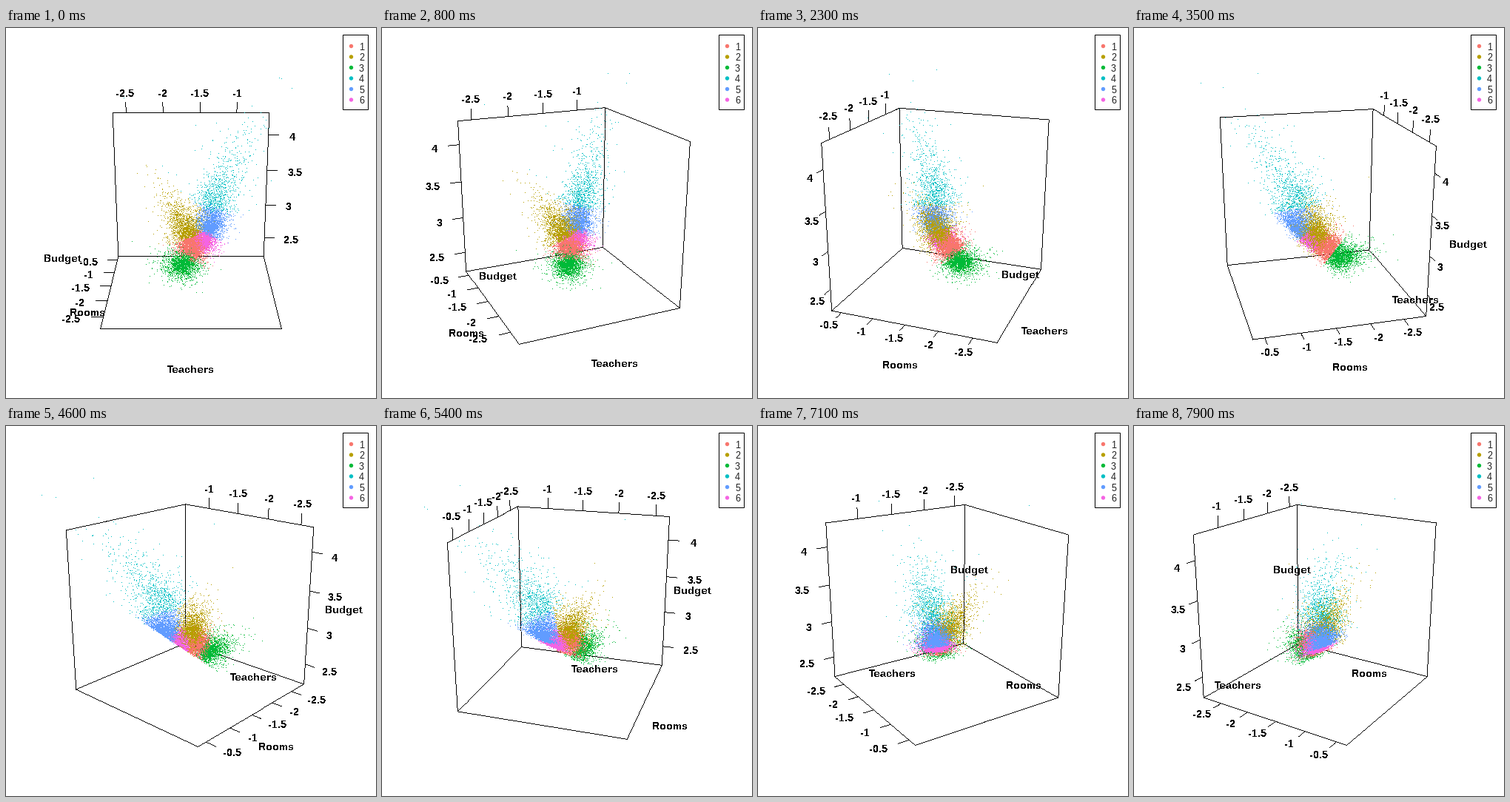
These frames come from a looping animation (500x500 px, 8000 ms). A matplotlib script:

```python
import numpy as np
import matplotlib.pyplot as plt
from matplotlib.animation import FuncAnimation
from matplotlib.colors import to_rgb
from matplotlib.patches import Circle, Rectangle

plt.rcParams.update({"text.hinting": "native", "text.hinting_factor": 1})

SIZE, FRAMES, STEP = 500, 80, 3            # pixels, frames, degrees per frame
FOCAL, DIST, TILT = 933, 8.22, np.radians(20)
TICK, LABEL, TITLE = 1.133, 1.27, 1.30     # distances from the box centre
PX = 0.72                                  # points per pixel at 100 dpi
EM = 14
COLORS = ["#F8766D", "#B79F00", "#00BA38", "#00BFC4", "#619CFF", "#F564E3"]

# ticks per axis: value and position inside the unit box
X_TICKS = [(v, 1.528 + 0.943 * v) for v in (-2.5, -2, -1.5, -1)]
Y_TICKS = [(v, 0.956 * v - 3.118) for v in (2.5, 3, 3.5, 4)]
Z_TICKS = [(v, -1.272 - 0.80 * v) for v in (-0.5, -1, -1.5, -2, -2.5)]
TITLES = {"Teachers": (0, -TITLE, TITLE),
          "Budget": (-TITLE, 0, TITLE),
          "Rooms": (-TITLE, -TITLE, 0)}

# start (x, y, z), mean tail (x, y, z), spread along x-z, x+z and y, count
CLUSTERS = [((0.00, -0.44, 0.10), (0.00, 0.01, 0.00), (0.08, 0.07, 0.07), 2300),
            ((0.00, -0.33, 0.00), (-0.07, 0.12, -0.04), (0.08, 0.09, 0.08), 1900),
            ((-0.06, -0.59, 0.18), (-0.04, 0.03, 0.08), (0.08, 0.09, 0.07), 1900),
            ((0.20, -0.02, -0.10), (0.14, 0.22, -0.14), (0.12, 0.10, 0.13), 950),
            ((0.20, -0.30, -0.16), (0.03, 0.05, -0.03), (0.09, 0.08, 0.10), 2300),
            ((0.14, -0.43, -0.07), (0.00, 0.01, 0.00), (0.07, 0.07, 0.07), 2200)]


def rotate(p, deg):
    """Spin about the vertical axis, then tilt towards the viewer."""
    x, y, z = np.asarray(p, float).T
    a = np.radians(deg)
    x, z = x * np.cos(a) + z * np.sin(a), z * np.cos(a) - x * np.sin(a)
    c, s = np.cos(TILT), np.sin(TILT)
    return x, y * c - z * s, y * s + z * c


def project(p, deg):
    x, y, z = rotate(p, deg)
    k = FOCAL / (DIST - z)
    return np.stack([SIZE / 2 + k * x, SIZE / 2 - k * y], -1)


def make_cloud():
    rng = np.random.default_rng(4)
    parts = []
    for start, tail, spread, n in CLUSTERS:
        heavy = np.sqrt(6 / rng.chisquare(6, n)).clip(0, 1.7)
        u, w, y = rng.normal(size=(3, n)) * heavy * np.array(spread)[:, None]
        blob = np.stack([(u + w) / 2**0.5, y, (w - u) / 2**0.5], -1)
        parts.append(start + blob + rng.exponential(size=(n, 1)) * tail)
    pts = np.concatenate(parts)
    # the cloud has a sharp lower side: fold what falls below it
    x, y, _ = rotate(pts, 138)
    gap = y + 0.675 * x + 0.52
    pts[:, 1] += np.where(gap < 0, -1.5 * gap, 0)
    centers = np.array([np.add(start, tail) for start, tail, _, _ in CLUSTERS])
    group = ((pts[:, None] - centers) ** 2).sum(-1).argmin(1)
    return pts, np.array([to_rgb(c) for c in COLORS])[group]


def box_edges(deg):
    """Edges of the floor and of the walls that face away from the viewer."""
    faces = [(1, -1)]
    for axis in (0, 2):
        for sign in (-1, 1):
            normal = np.zeros(3)
            normal[axis] = sign
            if rotate(normal, deg)[2] < -1e-6:
                faces.append((axis, sign))
    edges = set()
    for axis, sign in faces:
        ring = []
        for a, b in ((-1, -1), (-1, 1), (1, 1), (1, -1)):
            p = [a, b]
            p.insert(axis, sign)
            ring.append(tuple(p))
        edges |= {tuple(sorted((ring[i - 1], ring[i]))) for i in range(4)}
    return sorted(edges)


def axis_marks(deg):
    """Yield (value, foot, outward direction) for every tick."""
    back = -1 if deg <= 90 else 1
    for v, t in X_TICKS:
        yield v, (t, 1, back), (0, 1, 0)

    if deg == 0 or deg == 90:
        ex, ez = 1, -1
    elif deg < 180:
        ex, ez = -1, (-1 if deg < 90 else 1)
    else:
        ex, ez = 1, 1
    for v, t in Y_TICKS:
        yield v, (ex, t, ez), (ex, 0, 0)

    side = -1 if deg <= 180 else 1
    on_top = deg % 180 != 0 and abs(np.sin(np.radians(deg))) < np.tan(TILT)
    for v, t in Z_TICKS:
        if on_top:
            yield v, (-side, 1, t), (0, 1, 0)
        else:
            yield v, (side, -1, t), (side, 0, 0)


def half_width(s):
    return EM / 2 * sum({"-": 0.333, ".": 0.278}.get(c, 0.556) for c in s)


def draw_line(canvas, ends):
    """One-pixel line without smoothing."""
    n = int(np.abs(ends[1] - ends[0]).max()) + 1
    x, y = np.linspace(ends[0], ends[1], n + 1).astype(int).T
    canvas[y, x] = 0


fig = plt.figure(figsize=(SIZE / 100, SIZE / 100), dpi=100, facecolor="white")
ax = fig.add_axes([0, 0, 1, 1])
image = ax.imshow(np.ones((SIZE, SIZE, 3)), extent=(0, SIZE, SIZE, 0),
                  interpolation="nearest", aspect="auto")
ax.set(xlim=(0, SIZE), ylim=(SIZE, 0))
ax.axis("off")


def new_text(s=""):
    return ax.text(0, 0, s, family="Liberation Sans", weight="bold", size=EM * PX,
                   ha="center", va="baseline", antialiased=False, zorder=3)


labels = [new_text() for _ in X_TICKS + Y_TICKS + Z_TICKS]
titles = {name: new_text(name) for name in TITLES}

ax.add_patch(Rectangle((455.5, 9.5), 34, 101, fc="white", ec="black", lw=PX,
                       snap=False, zorder=4))
for i, color in enumerate(COLORS):
    y = 24.5 + 14.5 * i
    ax.add_patch(Circle((466.5, y), 2.7, fc=color, ec="none", zorder=5))
    ax.text(480.5, y + 5.3, str(i + 1), family="Liberation Sans", size=13 * PX,
            color="#222222", ha="center", va="baseline", zorder=5)

points, point_colors = make_cloud()


def draw(frame):
    deg = frame * STEP
    canvas = np.ones((SIZE, SIZE, 3))
    for edge in box_edges(deg):
        draw_line(canvas, project(edge, deg))

    for text, (value, foot, out) in zip(labels, axis_marks(deg)):
        foot, out = np.array(foot), np.array(out)
        tip, anchor = foot + out * (TICK - 1), foot + out * (LABEL - 1)
        draw_line(canvas, project([foot, tip], deg))
        s = f"{value:g}"
        dx = rotate(out, deg)[0]
        shift = np.sign(dx) * np.clip((abs(dx) - 0.3) / 0.6, 0, 1) * half_width(s)
        x, y = project(anchor, deg)
        text.set_text(s)
        text.set_position((x + shift, y + 7))

    for name, text in titles.items():
        x, y = project(TITLES[name], deg)
        text.set_position((x, y + 7))

    order = np.argsort(rotate(points, deg)[2])
    px, py = project(points[order], deg).astype(int).clip(0, SIZE - 1).T
    canvas[py, px] = point_colors[order]
    image.set_data(canvas)
    return [image, *labels, *titles.values()]


anim = FuncAnimation(fig, draw, frames=FRAMES, interval=100, repeat=True, repeat_delay=0)
plt.show()
```
